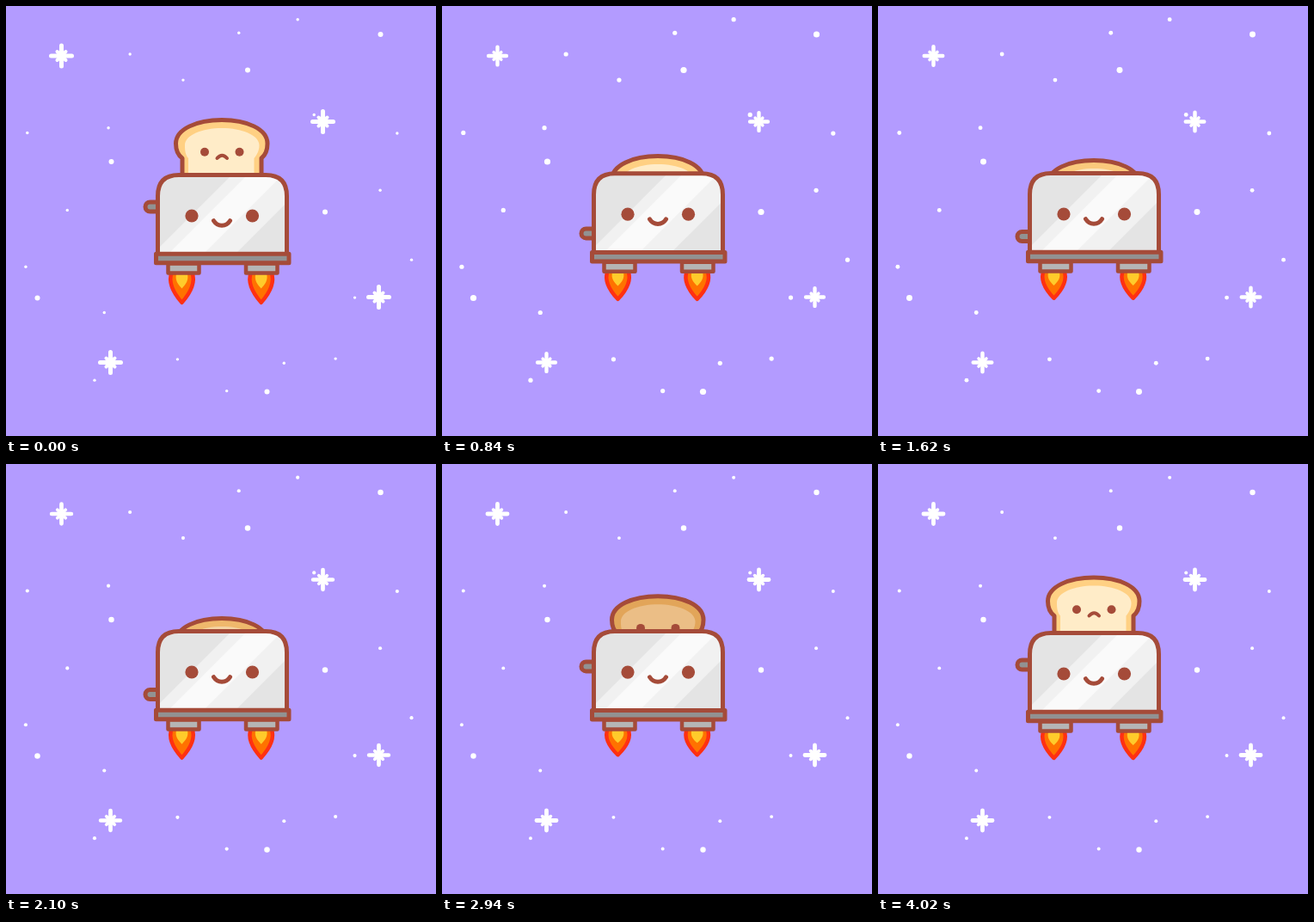
Animation of 500 by 500 pixels, one loop 4080 ms. Source, as an HTML page:

```html
<!DOCTYPE html>
<html lang="en">
<head>
<meta charset="utf-8">
<title>Rocket toaster</title>
<style>
  html, body { margin: 0; width: 100%; height: 100%; overflow: hidden; background: #b39bff; }
  svg { display: block; width: 100vw; height: 100vh; }
  .line { stroke: #a54b39; stroke-width: 5; stroke-linecap: round; stroke-linejoin: round; }
  .ink { fill: #a54b39; }
</style>
</head>
<body>
<svg viewBox="0 0 500 500">
  <defs>
    <path id="case" d="M176.500 289V221Q176.500 196.500 201 196.500H302Q326.500 196.500 326.500 221V289Z"/>
    <clipPath id="shell"><use href="#case"/></clipPath>
    <g id="star" fill="none" stroke="#fff" stroke-linecap="round">
      <path stroke-width="5" d="M-12 0H12M0-12V12"/>
      <path stroke-width="4" d="M-5-5L5 5M5-5L-5 5"/>
    </g>
    <g id="flame">
      <path d="M-12 -2C-17 12-7 25 0 33C7 25 17 12 12 -2Z" fill="#ff7200" stroke="#ff3012" stroke-width="4.500" stroke-linejoin="round"/>
      <path d="M-6 -2C-9 7-4 12 0 16.500C4 12 9 7 6 -2Z" fill="#ffcb2b"/>
    </g>
  </defs>
  <rect width="500" height="500" fill="#b39bff"/>
  <g id="sky"></g>
  <g id="bread">
    <path id="crust" class="line" d="M205 226V177C199.500 173 197.500 166 197.500 160C197.500 143 222 132.500 251 132.500S304 143 304 160C304 166 302 173 297 177V226Z"/>
    <path id="crumb" d="M212 223V177C208.500 173 208 168 208 162C208 150 228 142 251 142S294.500 150 294.500 162C294.500 168 292 173 288.500 177V223Z"/>
    <g class="ink"><circle cx="231" cy="169.700" r="5"/><circle cx="271.500" cy="169.700" r="5"/></g>
    <path class="line" style="stroke-width:4" fill="none" d="M245.500 177Q251.300 170.500 257 177"/>
  </g>
  <g id="toaster">
    <g id="lever"><rect class="line" x="162" y="228" width="30" height="11" rx="5.500" fill="#929292"/></g>
    <g class="jet" data-x="204.500"><use href="#flame"/></g>
    <g class="jet" data-x="296.700"><use href="#flame"/></g>
    <g class="line" style="stroke-width:4.500" fill="#b5b5b5">
      <rect x="188.500" y="299.500" width="36" height="11"/>
      <rect x="279" y="299.500" width="36.500" height="11"/>
    </g>
    <g clip-path="url(#shell)">
      <rect x="170" y="190" width="165" height="105" fill="#e4e4e4"/>
      <path d="M269 190L164 295H260L365 190Z" fill="#f1f1f1"/>
      <path d="M287 190L182 295H223L328 190Z" fill="#fafafa"/>
    </g>
    <use href="#case" class="line" fill="none"/>
    <rect class="line" x="174.500" y="288.300" width="154.500" height="10.500" fill="#929292"/>
    <g class="ink"><circle cx="216" cy="244" r="7.600"/><circle cx="286.500" cy="244" r="7.600"/></g>
    <path class="line" fill="none" d="M241.500 249.700C246 257 256 257 260.500 249.700"/>
  </g>
</svg>
<script>
const LOOP = 4080, STEP = 60;
const POP = 2880, REFILL = 3360;
const TAU = 2 * Math.PI;
const $ = id => document.getElementById(id);
const NS = 'http://www.w3.org/2000/svg';

const stars = [[64.5, 58], [368.5, 134.5], [433.5, 338.5], [121.5, 414.5]];
const bigDots = [[435.5, 33], [281, 74.5], [122.5, 181], [371, 239.5], [36.5, 339.5], [303.5, 448.5]];

let seed = 7;
const random = () => (seed = seed * 16807 % 2147483647) / 2147483647;

// Small dots lie on a loose ring around the toaster.
const smallDots = Array.from({ length: 19 }, (_, i) => {
  const angle = (i + .4 * random()) * TAU / 19 - 1.2;
  const radius = (i % 2 ? 150 : 200) + 50 * random();
  return [250 + radius * Math.cos(angle), 245 + radius * Math.sin(angle)];
});

// Smooth step from 0 to 1 between two times.
function ramp(t, from, to) {
  const p = Math.min(1, Math.max(0, (t - from) / (to - from)));
  return p * p * (3 - 2 * p);
}

function breadY(t) {
  if (t < POP) return 47 * ramp(t, 600, 900);
  if (t < REFILL) return 47 - .4 * (t - POP) - .0005 * (t - POP) ** 2 - 60 * ramp(t, 2940, 3240);
  return 64 - 64.5 * ramp(t, 3460, 3840);
}

const mix = (a, b, p) => `rgb(${a.map((v, i) => Math.round(v + (b[i] - v) * p))})`;
const move = (el, x, y, more = '') => el.setAttribute('transform', `translate(${x} ${y}) ${more}`);

function add(name, attrs) {
  const el = document.createElementNS(NS, name);
  for (const key in attrs) el.setAttribute(key, attrs[key]);
  return $('sky').appendChild(el);
}

const dot = ([cx, cy]) => add('circle', { cx, cy, fill: '#fff' });
const starEls = stars.map(() => add('use', { href: '#star' }));
const bigEls = bigDots.map(dot);
const smallEls = smallDots.map(dot);
const jets = document.querySelectorAll('.jet');

function draw(t) {
  const twinkle = ramp(t, 0, 480) - .7 * ramp(t, 1200, 2400);
  starEls.forEach((el, i) => move(el, ...stars[i], `scale(${1 - .13 * twinkle})`));
  bigEls.forEach(el => el.setAttribute('r', 3 + .6 * twinkle));
  smallEls.forEach(el => el.setAttribute('r', 1.7 + .9 * twinkle));

  const pressed = ramp(t, 600, 900);
  move($('toaster'), 0, -2 * (pressed - ramp(t, POP, 3300)));
  move($('lever'), 0, 36.5 * (pressed - ramp(t, POP - 20, POP + 80)));
  move($('bread'), 0, breadY(t));

  const toast = t < REFILL ? ramp(t, 1200, POP) : 0;
  $('crust').setAttribute('fill', mix([255, 208, 131], [226, 165, 89], toast));
  $('crumb').setAttribute('fill', mix([255, 236, 200], [235, 190, 134], toast));

  const flicker = (1 - Math.cos(TAU * (16 * t / LOOP - .05))) / 2;
  jets.forEach(el => move(el, el.dataset.x, 312, `scale(1 ${1 - .14 * flicker})`));
}

const start = performance.now();
function tick() {
  const t = (performance.now() - start) % LOOP;
  draw(Math.floor(t / STEP) * STEP);
  requestAnimationFrame(tick);
}
tick();
</script>
</body>
</html>
```
